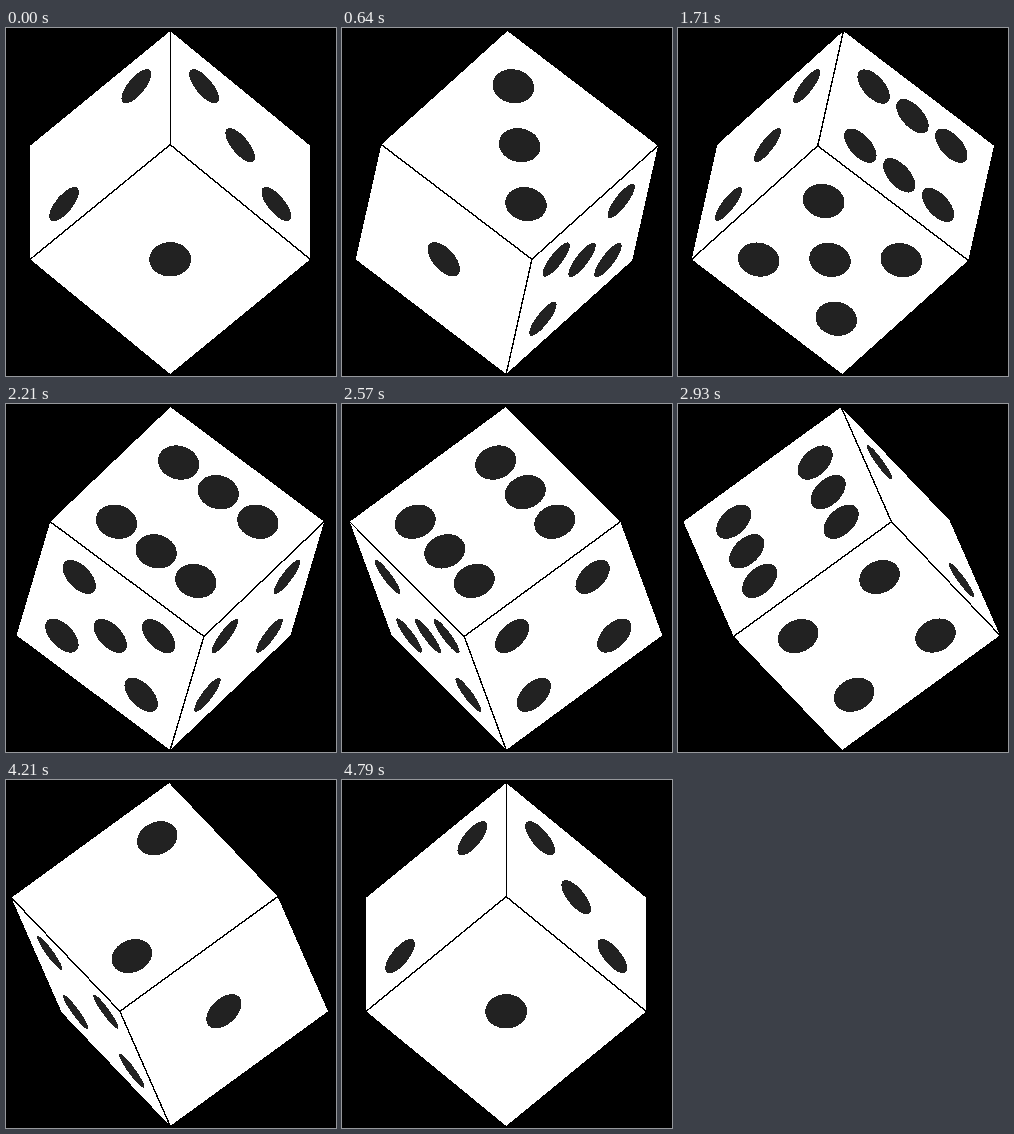
Animation of 330x348 px, one loop 4870 ms. Source, as an HTML page:

```html
<!DOCTYPE html>
<html lang="en">
<head>
<meta charset="utf-8">
<title>Spinning die</title>
<style>
  html, body { margin: 0; width: 100%; height: 100%; overflow: hidden; background: #000; }
  svg { display: block; }
</style>
</head>
<body>
<svg id="stage" width="330" height="348" shape-rendering="crispEdges"></svg>
<script>
const stage = document.getElementById("stage");
const EDGE = 198, PIP = 0.106, GAP = 0.258;
const FOOT = { x: 164.2, y: 346 };            // corner the die stands on
const LOOP = 4870, FPS = 14;
const RAD = Math.PI / 180, TILT = 55 * RAD;
const EDGE_ON = 0.05;                         // faces flatter than this are not drawn

// Pip positions in steps of GAP from the middle of a face
const DIAGONAL = [[-1, -1], [1, 1]];
const CORNERS = [...DIAGONAL, [-1, 1], [1, -1]];
const MIDDLE = [[0, 0]];
const SIDES = [[-1, 0], [1, 0]];

const face = pips => '<rect width="1" height="1" fill="#fff"/>' + pips.map(([u, v]) =>
  `<circle cx="${0.5 + u * GAP}" cy="${0.5 + v * GAP}" r="${PIP}" fill="#222"/>`).join("");

// Faces by the axis they are perpendicular to
const lowerFaces = [[...CORNERS, ...MIDDLE], CORNERS, MIDDLE].map(face);
const upperFaces = [DIAGONAL, [...DIAGONAL, ...MIDDLE], [...CORNERS, ...SIDES]].map(face);

// The three edges leaving the foot: left, right and back
const s = Math.sin(TILT), c = Math.cos(TILT), h = Math.SQRT1_2;
const axes = [[-h, s * h, c * h], [h, s * h, c * h], [0, c, -s]];

function turn([x, y, z], angle) {
  const sin = Math.sin(angle), cos = Math.cos(angle);
  return { x: EDGE * (x * cos - z * sin), y: -EDGE * y, z: z * cos + x * sin };
}

function draw(angle) {
  const edges = axes.map(axis => turn(axis, angle));
  const near = { ...FOOT };                   // corner closest to the viewer
  let faces = "", lines = "";
  for (const e of edges) if (e.z > 0) { near.x += e.x; near.y += e.y; }

  edges.forEach((e, k) => {
    const [p, q] = edges.filter(other => other !== e);
    const upper = e.z > 0, side = upper ? 1 : 0;
    const matrix = [p.x, p.y, q.x, q.y, FOOT.x + side * e.x, FOOT.y + side * e.y];
    if (Math.abs(e.z) > EDGE_ON) {
      faces += `<g transform="matrix(${matrix.map(n => n.toFixed(4))})">${(upper ? upperFaces : lowerFaces)[k]}</g>`;
    }
    const dir = upper ? -1 : 1;
    lines += `M${near.x} ${near.y}l${dir * e.x} ${dir * e.y}`;
  });
  stage.innerHTML = `${faces}<path d="${lines}" stroke="#000" stroke-width="1.4"/>`;
}

let shown = -1;
function tick() {
  const time = performance.now() % LOOP;
  const step = Math.min(67, Math.floor((time + 5) * FPS / 1000));
  // Three degrees every 40 ms, sampled at 14 pictures a second
  if (step !== shown) draw(3 * Math.ceil(step * 25 / FPS) * RAD);
  shown = step;
  requestAnimationFrame(tick);
}
tick();
</script>
</body>
</html>
```
